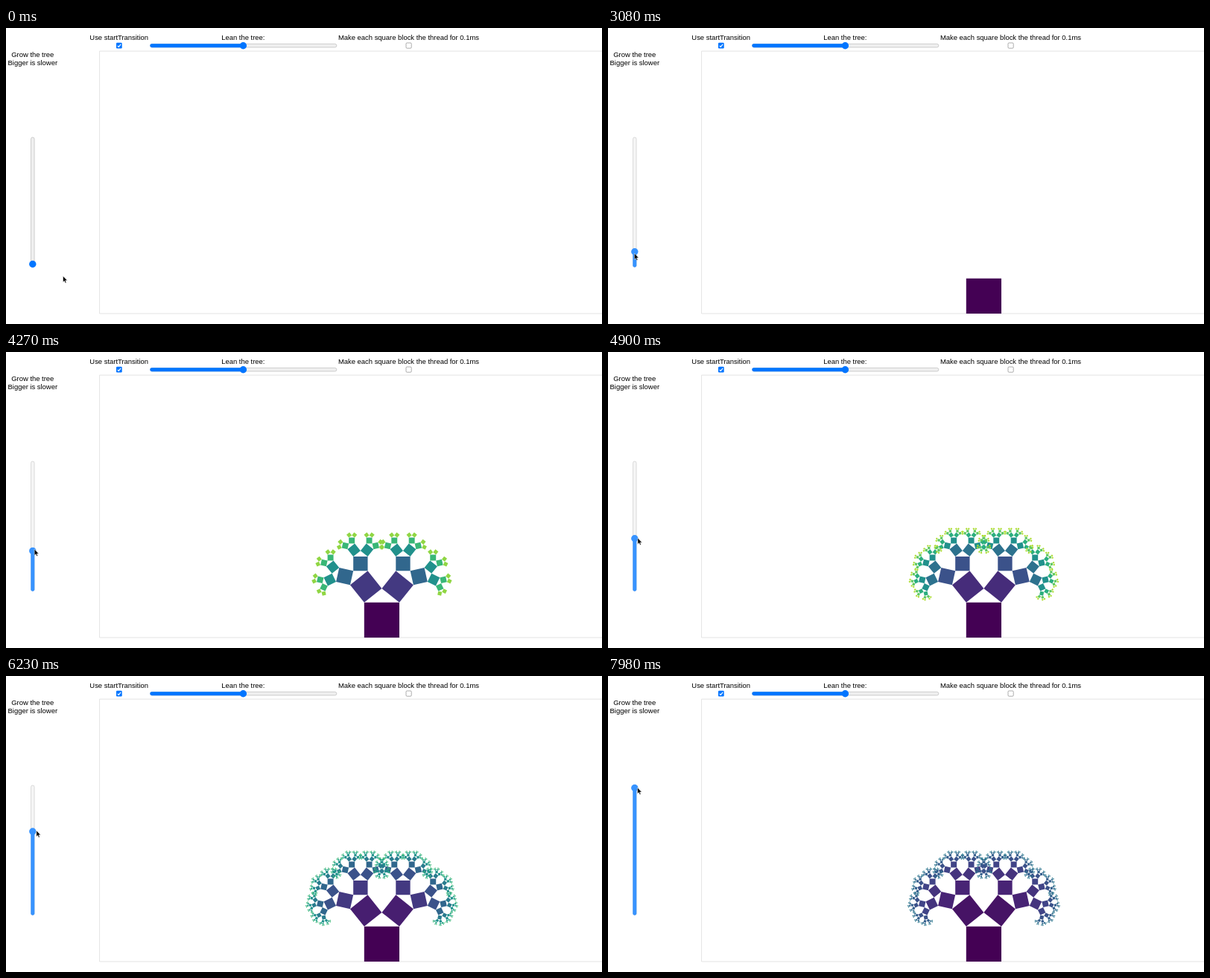
An HTML page that plays this animation: 800x398 px, repeating every 8 s.

```html
<!DOCTYPE html>
<html lang="en">
<head>
<meta charset="utf-8">
<title>Fractal tree</title>
<style>
  html, body { margin: 0; width: 100%; height: 100%; overflow: hidden; background: #fff; }
  svg { display: block; width: 800px; height: 398px; }
  text { font: 9.44px "Liberation Sans", Helvetica, Arial, sans-serif; text-anchor: middle; fill: #000; }
  .track { fill: #efefef; stroke: #b2b2b2; stroke-width: .6; }
  .blue { fill: #0075ff; }
</style>
</head>
<body>
<svg viewBox="0 0 800 398">
  <path d="M801 31.1H125.6V384H801" fill="none" stroke="#dcdcdc" stroke-width=".8"/>

  <text x="151.7" y="15.8">Use startTransition</text>
  <text x="318.3" y="15.8">Lean the tree:</text>
  <text x="540.5" y="15.8">Make each square block the thread for 0.1ms</text>
  <text x="35.8" y="39.3">Grow the tree</text>
  <text x="35.8" y="49.9">Bigger is slower</text>

  <rect class="blue" x="148" y="19.8" width="7.7" height="7.7" rx="1.3"/>
  <path d="M149.7 23.8l1.6 1.6 2.8-3.6" fill="none" stroke="#fff" stroke-width="1.2"/>
  <rect x="537" y="20" width="7.2" height="7.2" rx="1.3" fill="#fff" stroke="#767676" stroke-width=".6"/>

  <rect class="track" x="193.6" y="21.4" width="250.2" height="4.6" rx="2.3"/>
  <rect class="blue" x="193.3" y="21.2" width="125" height="5" rx="2.4"/>
  <circle class="blue" cx="318.4" cy="23.7" r="4.7"/>

  <rect class="track" id="rail" x="33.5" y="147" width="4.6" height="174.4" rx="2.3"/>
  <rect id="fill" x="33.3" width="5" rx="2.4"/>
  <circle id="thumb" cx="35.8" r="4.7"/>

  <g id="tree"></g>
  <path id="cursor" d="M0 0V8.3L1.9 6.6 3.1 9.5 4.5 8.9 3.3 6.1H5.8Z" fill="#000" stroke="#fff" stroke-width=".5"/>
</svg>
<script>
const LOOP = 8000;
const ROOT = 47.2, HEIGHT = 0.4, MIN_SIZE = 1;
const BOTTOM = 317.5, STEP = 8.35;
const PRESS = 1680, HOVER = 860;
const VIRIDIS = ['440154', '482475', '414487', '355f8d', '2a788e', '21918c',
  '22a884', '44bf70', '7ad151', 'bddf26', 'fde725'];

// [time, x, y] of the pointer tip
const POINTER = [
  [70, 76.5, 333.5], [500, 56, 328], [840, 37.5, 320], [1050, 35.2, 318.5], [1330, 34.8, 318],
  [2350, 34.8, 318], [2450, 35.4, 303], [3080, 35.4, 303], [4150, 37.8, 268],
  [5500, 41.5, 235.8], [7000, 40, 178], [7700, 39.5, 150]
];

const $ = id => document.getElementById(id);
const set = (node, attrs) => { for (const k in attrs) node.setAttribute(k, attrs[k]); };
const mix = (a, b, k) => a + (b - a) * k;

function viridis(u) {
  const p = u * 10, i = Math.min(9, Math.floor(p));
  const channel = (hex, c) => parseInt(hex.substr(c * 2, 2), 16);
  const rgb = [0, 1, 2].map(c => Math.round(mix(channel(VIRIDIS[i], c), channel(VIRIDIS[i + 1], c), p - i)));
  return `rgb(${rgb})`;
}

function pointerAt(t) {
  const next = POINTER.findIndex(k => k[0] > t);
  if (next === 0) return POINTER[0].slice(1);
  if (next < 0) return POINTER[POINTER.length - 1].slice(1);
  const a = POINTER[next - 1], b = POINTER[next], k = (t - a[0]) / (b[0] - a[0]);
  return [mix(a[1], b[1], k), mix(a[2], b[2], k)];
}

function sliderValue(t) {
  if (t < PRESS) return 0;
  return Math.max(0, Math.min(20, Math.round((BOTTOM + 1 - pointerAt(t)[1]) / STEP)));
}

// The tree renders later than the slider
function treeSize(t) {
  if (t < 2660) return 0;
  return t < 3150 ? 1 : sliderValue(t - 210);
}

// One path per level; (x, y) is the base's left corner, (ux, uy) the base vector
const levels = [];
function grow(x, y, ux, uy, level) {
  if (Math.hypot(ux, uy) < MIN_SIZE) return;
  const tx = x + uy, ty = y - ux;
  levels[level] = (levels[level] || '') + `M${x} ${y}l${ux} ${uy} ${uy} ${-ux} ${-ux} ${-uy}Z`;
  const lx = ux / 2 + uy * HEIGHT, ly = uy / 2 - ux * HEIGHT;
  grow(tx, ty, lx, ly, level + 1);
  grow(tx + lx, ty + ly, ux - lx, uy - ly, level + 1);
}
grow(480.8, 384, ROOT, 0, 0);

const branches = levels.map(d => {
  const path = document.createElementNS('http://www.w3.org/2000/svg', 'path');
  set(path, { d });
  return $('tree').appendChild(path);
});

let shown = -1;
function drawTree(size) {
  if (size === shown) return;
  shown = size;
  branches.forEach((path, level) => set(path, level < size
    ? { fill: viridis(level / size), display: 'inline' }
    : { display: 'none' }));
}

function draw(t) {
  const [x, y] = pointerAt(t);
  set($('cursor'), { transform: `translate(${x} ${y})` });

  const value = sliderValue(t - 100), thumbY = BOTTOM - value * STEP;
  const pressed = t >= PRESS;
  const color = pressed ? '#3793ff' : t >= HOVER ? '#005cc8' : '#0075ff';
  set($('rail'), { style: pressed ? 'fill:#f5f5f5;stroke:#c6c6c6' : '' });
  set($('thumb'), { cy: thumbY, fill: color });
  set($('fill'), { y: thumbY, height: 321.7 - thumbY, fill: color, display: value ? 'inline' : 'none' });

  drawTree(treeSize(t));
}

const start = performance.now();
function tick() {
  draw((performance.now() - start) % LOOP);
  requestAnimationFrame(tick);
}
tick();
</script>
</body>
</html>
```
